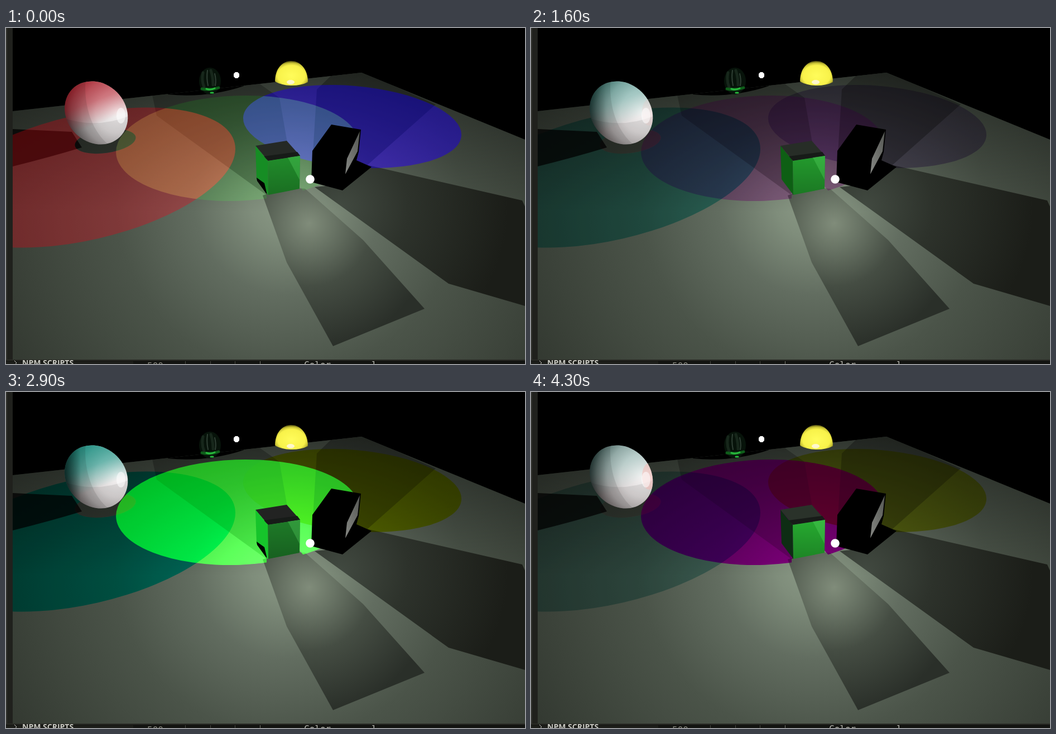
An HTML page that plays this animation: 930 by 602 pixels, repeating every 4400 ms.

```html
<!DOCTYPE html>
<html lang="en">
<head>
<meta charset="utf-8">
<title>Coloured spotlights</title>
<style>
  html, body { margin: 0; width: 100%; height: 100%; overflow: hidden; background: #000; }
  svg { display: block; width: 930px; height: 602px; background: #000; isolation: isolate; }
  .dim { mix-blend-mode: multiply; }
  .add { mix-blend-mode: plus-lighter; }
  .ui { font: bold 14px "Open Sans", "Noto Sans", sans-serif; fill: #c9c9c2; }
  .code { font: 16px "DejaVu Sans Mono", monospace; fill: #b8b8b0; }
</style>
</head>
<body>
<svg viewBox="0 0 930 602">
  <defs>
    <ellipse id="red" rx="276.8" ry="112.1" transform="translate(140 268) rotate(-12.9)"/>
    <ellipse id="green" rx="218" ry="94.2" transform="translate(415 215.5) rotate(-2.1)"/>
    <ellipse id="blue" rx="196.2" ry="72.8" transform="translate(620.5 176.5) rotate(5)"/>
    <ellipse id="ball" rx="60.5" ry="52.4" transform="translate(161.7 152) rotate(45)"/>
    <clipPath id="inGreen"><use href="#green"/></clipPath>
    <clipPath id="inBall"><use href="#ball"/></clipPath>
    <clipPath id="aroundBall">
      <path clip-rule="evenodd" d="M0 0H930V602H0zM123.500 211A55 21 -8 1 0 232.500 195A55 21 -8 1 0 123.500 211z"/>
    </clipPath>
    <clipPath id="aroundCube">
      <path clip-rule="evenodd" d="M0 0H930V602H0zM467 299L526 284L532 291L540 320H467z"/>
    </clipPath>
    <clipPath id="inFloor"><path id="floorShape" d="M12 149L637 80L930 200V594H12z"/></clipPath>

    <radialGradient id="floorLight" gradientUnits="userSpaceOnUse" cx="505" cy="310" r="560">
      <stop offset="0" stop-color="#8c9b87"/><stop offset=".12" stop-color="#7f8d7b"/>
      <stop offset=".3" stop-color="#626d60"/><stop offset=".55" stop-color="#4b5449"/>
      <stop offset="1" stop-color="#343a32"/>
    </radialGradient>
    <linearGradient id="far" gradientUnits="userSpaceOnUse" x1="0" y1="80" x2="0" y2="330">
      <stop stop-opacity=".45"/><stop offset="1" stop-opacity="0"/>
    </linearGradient>
    <radialGradient id="lampGlow" gradientUnits="userSpaceOnUse" cx="0" cy="0" r="1"
        gradientTransform="translate(395 182) scale(170 85)">
      <stop stop-color="#323a30"/><stop offset=".5" stop-color="#1c211b"/><stop offset="1" stop-color="#000"/>
    </radialGradient>
    <radialGradient id="nearShade" gradientUnits="userSpaceOnUse" cx="543" cy="350" r="225">
      <stop offset="0" stop-color="#808c7a"/><stop offset=".2" stop-color="#697465"/>
      <stop offset=".5" stop-color="#454d43"/><stop offset="1" stop-color="#2a2f29"/>
    </radialGradient>
    <radialGradient id="rightShade" gradientUnits="userSpaceOnUse" cx="600" cy="320" r="300">
      <stop offset="0" stop-color="#414940"/><stop offset=".4" stop-color="#2d322b"/>
      <stop offset="1" stop-color="#1b1d18"/>
    </radialGradient>
    <radialGradient id="ballLight" gradientUnits="userSpaceOnUse" cx="25" cy="-28" r="96">
      <stop offset="0" stop-color="#f6f4f4"/><stop offset=".4" stop-color="#dcd8d8"/>
      <stop offset=".65" stop-color="#b2adad"/><stop offset=".85" stop-color="#726b6b"/>
      <stop offset="1" stop-color="#2e2929"/>
    </radialGradient>
    <linearGradient id="ballTint" gradientUnits="userSpaceOnUse" x1="-50" y1="-22" x2="18" y2="8">
      <stop offset="0"/><stop offset=".45" stop-opacity=".75"/><stop offset="1" stop-opacity="0"/>
    </linearGradient>
    <linearGradient id="ballEdge" gradientUnits="userSpaceOnUse" x1="105" y1="0" x2="134" y2="0">
      <stop stop-opacity=".95"/><stop offset="1" stop-opacity="0"/>
    </linearGradient>
    <radialGradient id="sun" cx=".5" cy=".6" r=".6">
      <stop offset="0" stop-color="#fffc5a"/><stop offset=".7" stop-color="#f8f24a"/>
      <stop offset=".86" stop-color="#c6c034"/><stop offset="1" stop-color="#47440d"/>
    </radialGradient>
    <linearGradient id="frontFade" x1="0" y1="0" x2="0" y2="1">
      <stop stop-opacity="0"/><stop offset="1" stop-opacity=".22"/>
    </linearGradient>
    <linearGradient id="boxSide" x1="1" y1="0" x2="0" y2="1">
      <stop stop-color="#555753"/><stop offset="1" stop-color="#868884"/>
    </linearGradient>
  </defs>

  <!-- floor and the shadows of the white lights -->
  <use href="#floorShape" fill="url(#floorLight)"/>
  <use href="#floorShape" fill="url(#far)"/>
  <g clip-path="url(#inFloor)">
    <path opacity=".25" d="M262 120L270 157L465 298L510 240L490 125L453 99z"/>
    <path opacity=".3" d="M584 84L557 110L549 240L620 270L770 137L637 78z"/>
    <path opacity=".74" d="M12 181L118 186L136 214Q80 231 12 248z"/>
    <ellipse cx="178" cy="203" rx="55" ry="21" transform="rotate(-8 178 203)" opacity=".3"/>
    <path d="M290 119Q360 126 426 104V95H290z"/>
    <path fill="url(#nearShade)" d="M460 300L503 420L586 570L750 503L640 380L536 288L500 285z"/>
    <path fill="url(#rightShade)" d="M553 285L793 458L930 498V320L925 309L628 241L600 280z"/>
  </g>

  <!-- spotlights: dim the floor, add light, then remove a channel -->
  <use href="#red" id="redDim" class="dim" clip-path="url(#aroundBall)"/>
  <use href="#green" id="greenDim" class="dim" clip-path="url(#aroundCube)"/>
  <use href="#blue" id="blueDim" class="dim"/>
  <use href="#green" fill="url(#lampGlow)" class="add" clip-path="url(#aroundCube)"/>
  <use href="#red" id="redAdd" class="add" clip-path="url(#aroundBall)"/>
  <use href="#red" id="redMix" class="add" clip-path="url(#inGreen)"/>
  <use href="#green" id="greenAdd" class="add" clip-path="url(#aroundCube)"/>
  <use href="#blue" id="blueAdd" class="add"/>
  <use href="#red" id="redCut" class="dim" clip-path="url(#aroundBall)"/>
  <use href="#green" id="greenCut" class="dim" clip-path="url(#aroundCube)"/>
  <use href="#blue" id="blueCut" class="dim"/>
  <use href="#blue" id="blueMix" class="add" clip-path="url(#inGreen)"/>

  <!-- large ball -->
  <use href="#ball" fill="url(#ballLight)"/>
  <use href="#ball" fill="url(#ballTint)" id="tint"/>
  <g clip-path="url(#inBall)">
    <path opacity=".1" d="M143 90C138 135 153 187 188 212H95V90z"/>
    <path opacity=".08" d="M100 160Q160 182 222 157V215H100z"/>
    <rect id="edge" x="100" y="90" width="40" height="125" fill="url(#ballEdge)"/>
    <ellipse id="spot" cx="212" cy="151" rx="13" ry="24" fill="#f7b8b2"/>
    <ellipse cx="206" cy="157" rx="8" ry="14" fill="#fff" opacity=".55"/>
  </g>

  <!-- small dark ball, lamps and sun -->
  <ellipse cx="365.500" cy="95" rx="19.500" ry="24" fill="#07130a"/>
  <g fill="none" stroke-linecap="round" opacity=".8">
    <path stroke="#1b2c20" stroke-width="5" d="M353 80Q350 94 355 106M367 76Q371 88 371 102"/>
    <path stroke="#3a4a3f" stroke-width="2" d="M361 76Q359 90 362 103M374 82Q377 94 375 103"/>
    <path stroke="#12701f" stroke-width="5" d="M351 109Q367 112 381 107"/>
    <path stroke="#31e04a" stroke-width="3" d="M359 109Q366 112 374 108M367 116L371 116"/>
  </g>
  <path fill="#fff" d="M411 79H415L418 82V87L415 90H411L408 87V82z"/>
  <path fill="url(#sun)" d="M482 96C482 72 496 59 511 59S541 72 541 97Q529 103 512 103T482 96z"/>
  <ellipse cx="510" cy="97" rx="7" ry="4" fill="#fff7d8" opacity=".9"/>

  <!-- green cube -->
  <path id="cubeTop" d="M447 211L503 202L527 229L470 238z"/>
  <path fill="#171b18" d="M461 230L522 222L527 229L470 238z"/>
  <path id="cubeSide" d="M447 211L469 238L470 299L449 271z"/>
  <path id="cubeHole" d="M449 268L463 278L468 299L450 274z"/>
  <path id="cubeFront" d="M469 238L527 229L526 288L470 299z"/>
  <path fill="url(#frontFade)" d="M469 238L527 229L526 288L470 299z"/>
  <path fill="#5ddc69" opacity=".3" d="M505 232L527 229L526 272z"/>

  <!-- black box and the near lamp -->
  <path d="M583 173L636 182L632 222L628 237L655 249L603 291L547 276L549 220z"/>
  <path fill="url(#boxSide)" d="M634 185L630 221L608 262L611 234z"/>
  <circle cx="545" cy="271" r="7.800" fill="#fff"/>

  <!-- editor around the view -->
  <path fill="#20211d" d="M0 0H12V602H0z"/>
  <path fill="#33342f" d="M0 0H2V596H0z"/>
  <path fill="#131411" d="M0 594H930V602H0z"/>
  <path fill="#2a2b26" d="M0 594H930V596H0z"/>
  <path fill="#1c1d19" d="M0 597H228V602H0z"/>
  <path fill="none" stroke="#c9c9c2" d="M15 596L19 600L15 604"/>
  <text class="ui" x="29" y="605">NPM SCRIPTS</text>
  <g class="code">
    <text x="253" y="611" fill="#85857c">500</text>
    <text x="534" y="609">Color</text>
    <text x="655" y="609">l</text>
  </g>
  <path stroke="#4a4b44" d="M321.500 597V602M366.500 597V602M410.500 597V602"/>
  <path stroke="#77786f" d="M455.500 597V602"/>
</svg>
<script>
  const LOOP = 4400, STEP = 100;
  const times = [0, 400, 1200, 2000, 2900, 3800, 4300];
  const levels = {
    red: [.55, -1, -1, .06, -.95, 1, -.28],
    green: [.15, -1, -1, .32, .88, 1, -1],
    blue: [.9, -.9, -1, .9, -1, 1, -.75]
  };

  const el = id => document.getElementById(id);
  const pos = v => Math.max(0, v);
  const rgb = (...c) => `rgb(${c.map(v => Math.round(Math.min(255, pos(v)))).join()})`;
  const scale = (...c) => rgb(...c.map(v => v * 255));
  const fill = (id, color) => el(id).setAttribute("fill", color);
  const fade = (id, v) => el(id).setAttribute("opacity", v);

  // Signed strength of a spotlight, eased between turning points
  function level(keys, t) {
    let i = 0;
    while (i < times.length - 2 && t > times[i + 1]) i++;
    const k = (t - times[i]) / (times[i + 1] - times[i]);
    return keys[i] + (keys[i + 1] - keys[i]) * (1 - Math.cos(Math.PI * k)) / 2;
  }

  function draw(t) {
    const r = level(levels.red, t), g = level(levels.green, t), b = level(levels.blue, t);

    fill("redDim", scale(.84, .76 - .17 * r, .78 - .1 * r));
    const side = .95 - .25 * pos(-g) - .1 * pos(g);
    fill("greenDim", scale(side, 1, side));
    fill("blueDim", scale(.72, .62 - .18 * b, .9));

    fill("redAdd", rgb(115 * pos(r), 0, 5 * pos(r)));
    fill("redMix", rgb(60 * pos(r), 25 * pos(r), 20 * pos(r)));
    fill("greenAdd", rgb(30 * pos(-g), 155 * pos(g), 30 * pos(-g)));
    fill("blueAdd", rgb(12 * pos(-b), 12 * pos(-b), 100 * pos(b)));

    fill("redCut", scale(1 + 1.1 * Math.min(0, r), 1, 1));
    fill("greenCut", scale(1, 1 + 1.1 * Math.min(0, g), 1));
    fill("blueCut", scale(1, 1, 1 + 1.1 * Math.min(0, b)));
    fill("blueMix", rgb(25 * pos(b), 38 * pos(b), 10 * pos(b) + 35 * pos(-b)));

    const tint = r > 0 ? "#be1423" : "#159a8a";
    for (const s of el("ballTint").children) s.setAttribute("stop-color", tint);
    fade("tint", Math.min(.85, Math.abs(r) * (r > 0 ? 1.2 : .8)));
    fade("edge", .65 * pos(-r));
    fade("spot", .5 * pos(-g));

    fill("cubeTop", rgb(38 - 4 * g, 42 - 8 * g, 38 - 4 * g));
    fill("cubeSide", g < 0 ? rgb(14, 45 + 75 * (1 + g), 20) : rgb(22, 130 + 75 * g, 34 + 10 * g));
    fade("cubeHole", Math.min(1, pos(g) * 7));
    fill("cubeFront", rgb(34 - 4 * g, 145 - 25 * g, 44 - 4 * g));
  }

  function tick(now) {
    draw(Math.floor(now % LOOP / STEP) * STEP);
    requestAnimationFrame(tick);
  }
  draw(0);
  requestAnimationFrame(tick);
</script>
</body>
</html>
```
